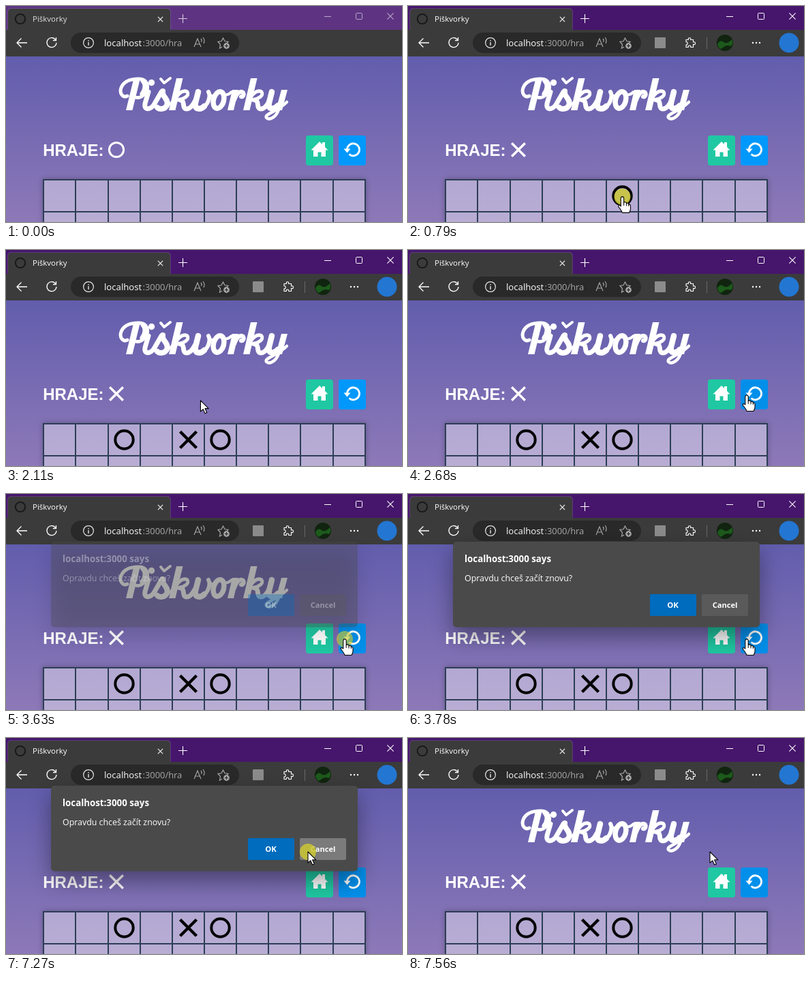
Recreate the animation shown at these times as an HTML page with a canvas. Size 581x317 px, loop 8000 ms.

```html
<!DOCTYPE html>
<html lang="cs">
<head>
<meta charset="utf-8">
<title>Piškvorky</title>
<style>
html, body { margin: 0; width: 100%; height: 100%; overflow: hidden; background: #3b3b3b; }
canvas { display: block; width: 581px; height: 317px; }
</style>
</head>
<body>
<canvas id="stage" width="581" height="317"></canvas>
<script>
const ctx = document.getElementById('stage').getContext('2d');
const W = 581, H = 317, LOOP = 8000, BAR_Y = 35, PAGE_Y = 74;
const UI = '"Open Sans", "Noto Sans", sans-serif';
const CELL = 47.14, GRID_X = 55.3, GRID_Y = 255;

const clamp = v => Math.max(0, Math.min(1, v));
const ramp = (t, a, b) => clamp((t - a) / (b - a));
const ease = {
  both: k => k * k * (3 - 2 * k),
  in: k => k * k,
  out: k => 1 - (1 - k) * (1 - k),
  linear: k => k
};

function rect(x, y, w, h, color, r = 0) {
  ctx.fillStyle = color;
  ctx.beginPath();
  ctx.roundRect(x, y, w, h, r);
  ctx.fill();
}

function line(d, color, width = 1.2) {
  ctx.strokeStyle = color;
  ctx.lineWidth = width;
  ctx.stroke(new Path2D(d));
}

function fill(d, color) {
  ctx.fillStyle = color;
  ctx.fill(new Path2D(d));
}

function ring(x, y, r, color, width) {
  ctx.strokeStyle = color;
  ctx.lineWidth = width;
  ctx.beginPath();
  ctx.arc(x, y, r, 0, Math.PI * 2);
  ctx.stroke();
}

function disc(x, y, r, color) {
  ctx.fillStyle = color;
  ctx.beginPath();
  ctx.arc(x, y, r, 0, Math.PI * 2);
  ctx.fill();
}

function text(str, x, y, font, color, align = 'left') {
  ctx.font = font;
  ctx.fillStyle = color;
  ctx.textAlign = align;
  ctx.fillText(str, x, y);
}

function cross(x, y, r, color, width) {
  line(`M${x - r} ${y - r}L${x + r} ${y + r}M${x + r} ${y - r}L${x - r} ${y + r}`, color, width);
}

// Pointer stops: time, x, y, easing towards the stop
const stops = [
  [390, 331, 318], [520, 318, 280, 'out'], [760, 318, 280], [940, 273, 279, 'both'],
  [1200, 273, 279], [1430, 160, 279, 'both'], [1720, 160, 279], [1940, 192, 252, 'in'],
  [2220, 345, 201, 'linear'], [2680, 497, 213, 'out'], [4420, 497, 213],
  [4840, 424, 204, 'both'], [5040, 424, 204], [5220, 460, 163, 'both'], [5340, 443, 167, 'both']
];
const clicks = [690, 1140, 1560, 3500, 7270];

function pointerAt(t) {
  if (t < stops[0][0]) return null;
  const i = stops.findIndex(s => s[0] > t);
  if (i < 0) return stops[stops.length - 1].slice(1, 3);
  const [t0, x0, y0] = stops[i - 1], [t1, x1, y1, kind] = stops[i];
  const k = ease[kind || 'linear'](ramp(t, t0, t1));
  return [x0 + (x1 - x0) * k, y0 + (y1 - y0) * k];
}

const inside = ([x, y], l, t, r, b) => x >= l && x <= r && y >= t && y <= b;

function drawWindow(active) {
  const fg = active ? '#fff' : '#b9a6c9';
  rect(0, 0, W, BAR_Y, active ? '#46156c' : '#5e3482');
  rect(2, 3, 240, 36, active ? '#5c3a78' : '#6d4b8a', 5);
  rect(3, 4, 238, 36, '#3b3b3b', 5);
  rect(0, BAR_Y, W, PAGE_Y - BAR_Y, '#3b3b3b');
  ring(21, 19, 7.2, '#161616', 1.8);
  text('Piškvorky', 39, 23, '11.5px ' + UI, active ? '#fff' : '#dedede');
  cross(226.5, 19.5, 3.6, '#e8e8e8', 1.3);
  line('M253 18.5H266M259.5 12V25', active ? '#fff' : '#d5c8df', 1.1);
  line('M467 15.5H477M513.5 11.5Q513.5 10.5 514.5 10.5H521.5Q522.5 10.5 522.5 11.5V18.5Q522.5 19.5 521.5 19.5H514.5Q513.5 19.5 513.5 18.5Z', fg, 1);
  cross(564, 15, 4.6, fg, 1.1);
}

function drawToolbar(t) {
  const grey = '#a9a9a9';
  line('M31 54H16M22.5 47.5L16 54L22.5 60.5', '#fff', 1.3);
  line('M73 50A7 7 0 1 0 74 54M73.5 46V50.5H69', '#fff', 1.3);
  rect(95, 39, 247, 30, '#292929', 15);
  ring(121, 54, 7.4, '#e6e6e6', 1.2);
  line('M121 53V58M121 50V51.4', '#e6e6e6', 1.4);
  text('localhost', 144, 59, '13.2px ' + UI, '#fff');
  text(':3000/hra', 200.5, 59, '12.9px ' + UI, grey);
  line('M276 60L281 48L286 60M278 56H284M286 48Q288 50 286.5 53M289 46Q292.5 50 290 55', grey, 1.1);
  line('M317 60L313.5 62L314.5 56.5L311 52.5L316 51.8L318.5 47L321 51.8L326 52.5L324.5 54', grey, 1.2);
  disc(323.5, 58.5, 4.4, grey);
  line('M321 58.5H326M323.5 56V61', '#292929', 1.2);
  if (t < 30) return;
  rect(362, 46, 16, 16, '#8b8b8b', 1);
  line('M408 49.5H411.5Q410.5 46.7 413 46.7T414.6 49.5H418.5V53Q421.5 52 421.5 54.7T418.5 56.3V60.5H414.8Q415.4 58 413 58T411.3 60.5H408V57Q410.2 57 410.2 54.7T408 52.7Z', '#fff', 1.1);
  rect(438, 46, 1, 17, '#686868');
  disc(465, 54, 12, '#10240f');
  fill('M454 56Q458 49 463 53T475 49Q478 54 474 59Q467 56 462 61T454 56Z', '#1c5a1b');
  for (const x of [506, 511, 516]) disc(x, 54, 1.2, '#fff');
  disc(559, 54, 14.5, '#2376d2');
}

function drawTitle() {
  const put = (d, w) => line(d, '#fff', w);
  const stem = (x, y, x2, y2, w) => fill(`M${x} ${y}h${w}L${x2 + w} ${y2}h${-w}Z`, '#fff');
  const k = dx => {
    ctx.save();
    ctx.translate(dx, 0);
    stem(250, 106, 239, 153, 9.5);
    put('M247 140C251 130 259 122 266 126C270 131 261 137 252 138', 5);
    put('M256 138C264 139 257 151 265 151C270 151 274 146 277 140', 7);
    ctx.restore();
  };
  ctx.lineCap = ctx.lineJoin = 'round';
  put('M178 132C171 136 166 127 169 120C173 109 186 107 195 107C208 107 210 119 205 127C202 132 196 136 190 134', 5);
  put('M201 110C206 115 204 124 200 129', 7);
  stem(187, 108, 176, 153, 9.5);
  put('M209 126L204 143C202 153 211 153 217 145L228 126', 7);
  disc(213.5, 112.5, 4.7, '#fff');
  put('M230 125C228 133 240 137 236 146C233 152 225 152 222 149', 8);
  put('M227 107L232 113L241 106', 4);
  put('M236 147L244 141', 4);
  k(0);
  put('M282 126L278 142C276 152 285 153 291 147', 8.5);
  put('M288 149C296 146 301 133 297 126', 6);
  put('M297 128C300 134 306 132 309 129', 4);
  ctx.strokeStyle = '#fff';
  ctx.lineWidth = 7.5;
  ctx.beginPath();
  ctx.ellipse(312, 138, 7.5, 12.5, .26, 0, Math.PI * 2);
  ctx.stroke();
  put('M317 127C321 132 326 131 331 126', 4);
  stem(332, 123, 325, 153, 9);
  put('M335 138C339 127 344 124 348 127C350 131 347 134 345 133', 6);
  k(109);
  put('M390 126L386 142C384 152 392 153 399 146', 8.5);
  stem(404, 123, 396, 153, 9);
  put('M400 152C396 164 386 168 382 164C379 158 397 156 412 141', 4.5);
  ctx.lineCap = 'butt';
  ctx.lineJoin = 'miter';
}

function drawGrid() {
  const left = Math.round(GRID_X) - 1, width = Math.round(GRID_X + CELL * 10) + 1 - left;
  const cells = ctx.createLinearGradient(0, GRID_Y, 0, H);
  cells.addColorStop(0, '#b3a8d2');
  cells.addColorStop(1, '#b9add4');
  ctx.save();
  ctx.shadowColor = 'rgba(0,0,0,.28)';
  ctx.shadowBlur = 8;
  rect(left, GRID_Y - 1, width, 80, cells);
  ctx.restore();
  for (let i = 0; i <= 10; i++) rect(Math.round(GRID_X + i * CELL) - 1, GRID_Y - 1, 2, 80, '#2c3e55');
  for (const y of [GRID_Y, GRID_Y + 47]) rect(left, y - 1, width, 2, '#2c3e55');
}

function drawPage(t, active) {
  const bg = ctx.createLinearGradient(0, PAGE_Y, 0, H);
  bg.addColorStop(0, '#625dad');
  bg.addColorStop(1, '#8d79b8');
  rect(0, PAGE_Y, W, H - PAGE_Y, bg);
  drawTitle();

  text('HRAJE:', 54.2, 220, 'bold 24px "Liberation Sans", Arial, sans-serif', '#fff');
  const crossTurn = (t >= 740 && t < 1190) || t >= 1610;
  if (crossTurn) cross(162, 211, 9.8, '#fff', 3.4);
  else ring(162, 211, 10.6, '#fff', 3);

  rect(440, 190, 40, 44, '#1fc8a2', 4);
  fill('M447.5 211.5L460 199L464 203V200H468V207L472.5 211.5H469V221H462.5V214.5H457.5V221H451V211.5Z', '#fff');
  rect(488, 190, 40, 44, t >= 2600 ? '#028fea' : '#0098fb', 4);
  line('M500.5 211A9 9 0 1 1 503.5 217.5', '#fff', 2.8);
  fill('M495.5 209.5H505.5L500.5 215.5Z', '#fff');

  drawGrid();
  if (active) ring(314.5, 278.5, 13.2, '#000', 4);
  if (t >= 1190) cross(267.5, 278.5, 12, '#000', 4.4);
  if (t >= 1610) ring(173.5, 278.5, 13.2, '#000', 4);
}

function drawDialog(t, pointer) {
  const show = ramp(t, 3580, 3720) * (1 - ramp(t, 7380, 7500));
  if (!show) return;
  ctx.save();
  ctx.globalAlpha = show;
  ctx.shadowColor = 'rgba(0,0,0,.38)';
  ctx.shadowBlur = 32;
  ctx.shadowOffsetY = 14;
  rect(66, 70, 450, 125.5, '#4a4a4a', 5);
  ctx.shadowColor = 'transparent';
  text('localhost:3000 says', 83, 100, 'bold 13.3px ' + UI, '#fff');
  text('Opravdu chceš začít znovu?', 83, 128, '12.4px ' + UI, '#fff');
  rect(355, 147, 68, 32, '#006cbe', 2);
  const over = inside(pointer, 431, 147, 499, 179);
  rect(431, 147, 68, 32, t >= 7270 ? '#7b7b7b' : over ? '#6b6b6b' : '#5a5a5a', 2);
  text('OK', 388.5, 167, 'bold 11.4px ' + UI, '#fff', 'center');
  text('Cancel', 465, 167, 'bold 11.1px ' + UI, '#fff', 'center');
  ctx.restore();
}

function drawPointer(t, pointer) {
  const [x, y] = pointer;
  for (const c of clicks) {
    if (t < c || t > c + 200) continue;
    ctx.globalAlpha = .85 * (1 - ramp(t, c + 110, c + 200));
    disc(x, y, 12, '#cbc832');
    ctx.globalAlpha = 1;
  }
  const modal = t > 4420;
  const hand = !modal && (inside(pointer, GRID_X, GRID_Y, 528, H + 5)
    || inside(pointer, 440, 190, 480, 234) || inside(pointer, 488, 190, 528, 234));
  const shape = hand
    ? 'M-2.2 2Q-2 0 0 0T2.2 2V8.5Q4.5 7 6 9V10Q8 8.5 9.3 10.5V11.5Q11.5 10.5 12 13V18Q12 20 10 23.5H0Q-1 20.5 -5.8 14.5Q-6 11 -2.2 14Z'
    : 'M0 0V16.2L3.8 12.8L6.6 19L9.3 17.9L6.6 11.8H11.8Z';
  ctx.save();
  ctx.translate(x, y);
  ctx.lineJoin = 'round';
  fill(shape, '#fff');
  line(shape, '#000', 1.1);
  if (hand) line('M2.2 8.5V13M6 10V13.5M9.3 11.5V14', '#000', 1);
  ctx.restore();
}

function draw(t) {
  const active = t >= 740;
  const pointer = pointerAt(t);
  ctx.clearRect(0, 0, W, H);
  drawPage(t, active);
  drawWindow(active);
  drawToolbar(t);
  if (!pointer) return;
  drawDialog(t, pointer);
  drawPointer(t, pointer);
}

const start = performance.now();
function tick() {
  draw((performance.now() - start) % LOOP);
  requestAnimationFrame(tick);
}
tick();
</script>
</body>
</html>
```
